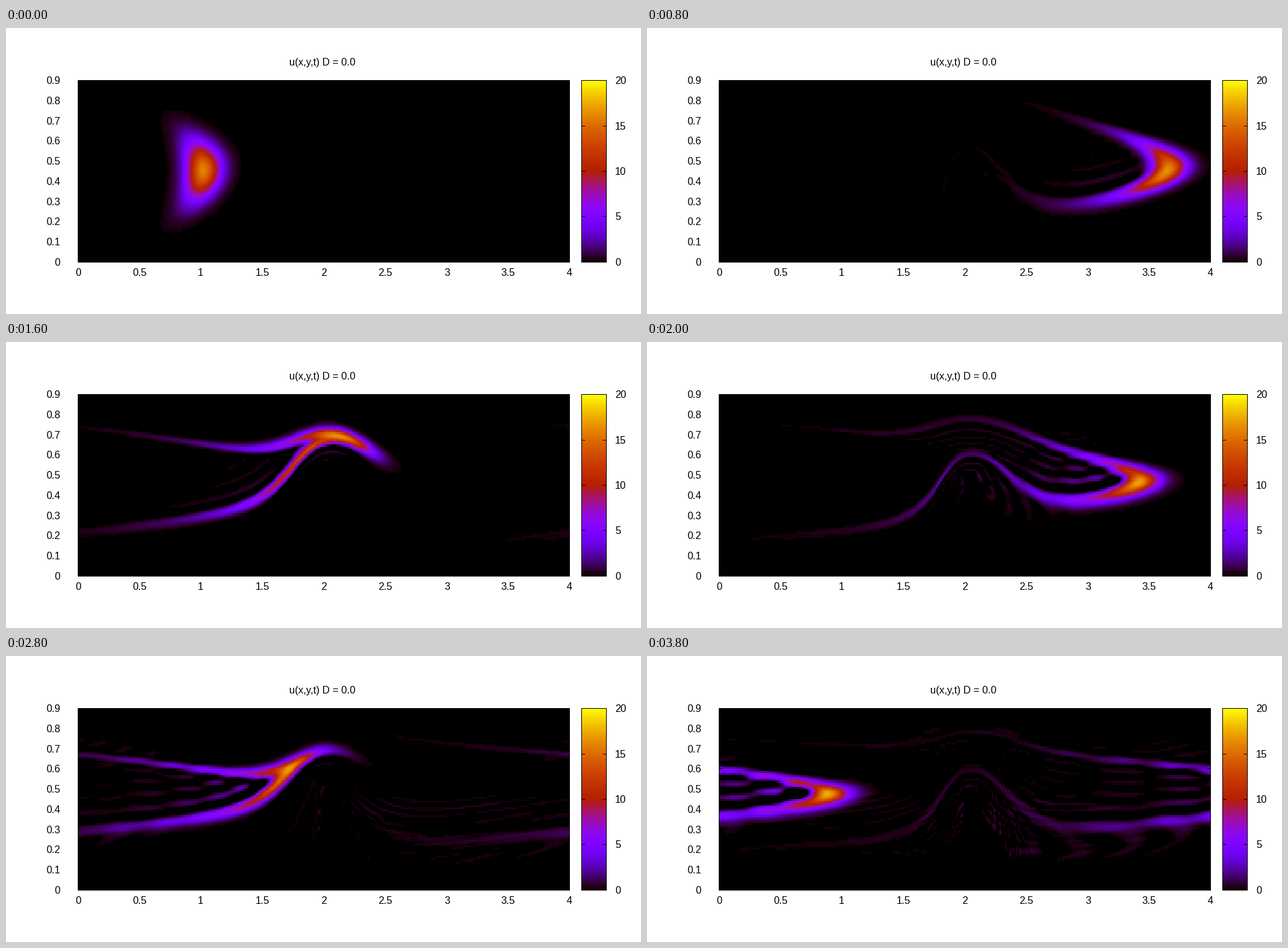
Recreate the animation shown at these times as a matplotlib script. Size 1000 by 450 pixels, loop 4 s.

```python
import numpy as np
import matplotlib.pyplot as plt
from matplotlib.animation import FuncAnimation
from matplotlib.colors import ListedColormap
from matplotlib.patches import Rectangle

plt.rcParams["font.family"] = "Liberation Sans"

# Channel of 4.0 x 0.9 on a grid of 0.01, with a beam standing on the floor.
NX, NY = 400, 90
I1, I2, J1 = 200, 210, 50
X0 = 80                  # the flow is plain Poiseuille left of this column
CELL_RE = 0.05           # inlet peak speed * cell size / viscosity
FRAMES, INTERVAL = 20, 200
STEPS, COURANT = 200, 0.625
SIGMA, START = 10.0, 45.0
N = NY + 1
FLUX = 2 * NY / 3


def flow_column(i, u, v):
    """Stream function and vorticity equations of one grid column."""
    a, w, e = np.zeros((3, 2 * N, 2 * N))
    b = np.zeros(2 * N)
    a[np.arange(2 * N), np.arange(2 * N)] = 1
    lo = J1 if I1 <= i <= I2 else 0
    f = np.arange(lo + 1, NY)
    g = f + N
    cx, cy = CELL_RE / 2 * u[i, f], CELL_RE / 2 * v[i, f]
    a[f, f] = a[g, g] = -4
    a[f, f - 1] = a[f, f + 1] = w[f, f] = e[f, f] = 1
    a[f, g] = -1
    a[g, g + 1], a[g, g - 1] = 1 - cy, 1 + cy
    e[g, g], w[g, g] = 1 - cx, 1 + cx
    # no-slip walls
    b[NY], b[-1] = FLUX, -2 * FLUX
    a[-1, NY - 1] = -2
    a[N + lo, lo + 1] = -2
    for side, m in ((I1, w), (I2, e)):
        if i == side:
            s = np.arange(1, lo)
            m[N + s, s] = -2
            m[N + lo, lo] = a[N + lo, lo + 1] = -1
    return a, w, e, b


def velocity(psi):
    u, v = np.zeros((2, NX + 1, N))
    u[:, 1:-1] = (psi[:, 2:] - psi[:, :-2]) / 2
    v[1:-1, 1:-1] = (psi[:-2, 1:-1] - psi[2:, 1:-1]) / 2
    u[I1:I2 + 1, :J1 + 1] = v[I1:I2 + 1, :J1 + 1] = 0
    return u, v


def solve_flow(rounds=4):
    """Steady viscous flow by block elimination, advection lagged."""
    y = np.arange(N)
    psi_in = 4 / NY**2 * (NY * y**2 / 2 - y**3 / 3)
    inlet = np.concatenate([psi_in, 4 / NY**2 * (NY - 2 * y)])
    psi = np.tile(psi_in, (NX + 1, 1))
    u, v = np.zeros((2, NX + 1, N))
    for _ in range(rounds):
        back, rhs = [], []
        gp, yp = np.zeros((2 * N, 2 * N)), inlet
        for i in range(X0, NX):
            a, w, e, b = flow_column(i, u, v)
            full = np.column_stack([e, b - w @ yp])
            sol = np.linalg.solve(a - w @ gp, full)
            gp, yp = sol[:, :-1], sol[:, -1]
            back.append(gp)
            rhs.append(yp)
        x = inlet
        for i in range(NX - 1, X0 - 1, -1):
            x = rhs[i - X0] - back[i - X0] @ x
            psi[i] = x[:N]
        u, v = velocity(psi)
    return u, v


def advect():
    """Central differences in space, fourth order in time, periodic in x."""
    u, v = solve_flow()
    dt = COURANT / np.hypot(u, v).max()
    cu, cv = -dt / 2 * u, -dt / 2 * v[:, 1:-1]
    x, y = np.meshgrid(np.arange(NX + 1), np.arange(N), indexing="ij")
    c = np.exp(-((x - START)**2 + (y - START)**2) / (2 * SIGMA**2))
    c *= 1e4 / (2 * np.pi * SIGMA**2)
    d = np.empty_like(c)
    shots = []
    for _ in range(FRAMES):
        for _ in range(STEPS):
            s = c
            for k in (4, 3, 2, 1):
                d[1:-1] = s[2:] - s[:-2]
                d[0] = s[1] - s[-1]
                d[-1] = s[0] - s[-2]
                d *= cu
                d[:, 1:-1] += cv * (s[:, 2:] - s[:, :-2])
                s = c + d / k
            c = s
        quad = (c[1:, 1:] + c[1:, :-1] + c[:-1, 1:] + c[:-1, :-1]) / 4
        shots.append(np.clip(quad.T / 20 * 128, 0, 127).astype(np.uint8))
    return shots


shots = advect()

g = np.linspace(0, 1, 128)
palette = ListedColormap(np.column_stack(
    [np.sqrt(g), g**3, np.clip(np.sin(2 * np.pi * g), 0, 1)]))

W, H = 1000, 450
LEFT, RIGHT, TOP, BOTTOM = 113, 887, 82, 368
BAR_L, BAR_R = 906, 945

fig = plt.figure(figsize=(W / 100, H / 100), dpi=100, facecolor="white")
ax = fig.add_axes([0, 0, 1, 1])
ax.axis("off")


def picture(data, l, r):
    return ax.imshow(data, cmap=palette, vmin=0, vmax=127, origin="lower",
                     extent=(l, r, BOTTOM, TOP), interpolation="nearest",
                     aspect="auto")


def block(x, y, w, h):
    """Black pixels, w wide and h high, from (x, y)."""
    ax.add_patch(Rectangle((x, y), w, h, fc="black", lw=0,
                           antialiased=False, zorder=4))


def label(x, y, s, ha):
    ax.text(x, y, s, ha=ha, va="baseline", fontsize=11.52, color="black")


def frame_box(l, r):
    for x in (l, r):
        block(x, TOP, 1, BOTTOM - TOP + 1)
    for y in (TOP, BOTTOM):
        block(l, y, r - l + 1, 1)


def side_ticks(l, r, y):
    block(l, y, 6, 1)
    block(r - 5, y, 6, 1)


field = picture(shots[0], LEFT, RIGHT)
picture(np.arange(128)[:, None], BAR_L, BAR_R)
frame_box(LEFT, RIGHT)
frame_box(BAR_L, BAR_R)

for k in range(10):
    y = round(BOTTOM - k * (BOTTOM - TOP) / 9)
    side_ticks(LEFT, RIGHT, y)
    label(85.5, y + 6, f"{k / 10:g}", "right")
for k in range(9):
    x = round(LEFT + k * (RIGHT - LEFT) / 8)
    block(x, BOTTOM - 5, 1, 5)
    block(x, TOP, 1, 6)
    label(x + 0.5, 390, f"{k / 2:g}", "center")
for k in range(5):
    y = round(BOTTOM - k * (BOTTOM - TOP) / 4)
    side_ticks(BAR_L, BAR_R, y)
    label(959, y + 6, str(5 * k), "left")
label(498, 59, "u(x,y,t) D = 0.0", "center")

ax.set_xlim(0, W)
ax.set_ylim(H, 0)


def update(n):
    field.set_data(shots[n])
    return (field,)


anim = FuncAnimation(fig, update, frames=FRAMES, interval=INTERVAL,
                     repeat=True, repeat_delay=0, blit=False)
plt.show()
```
